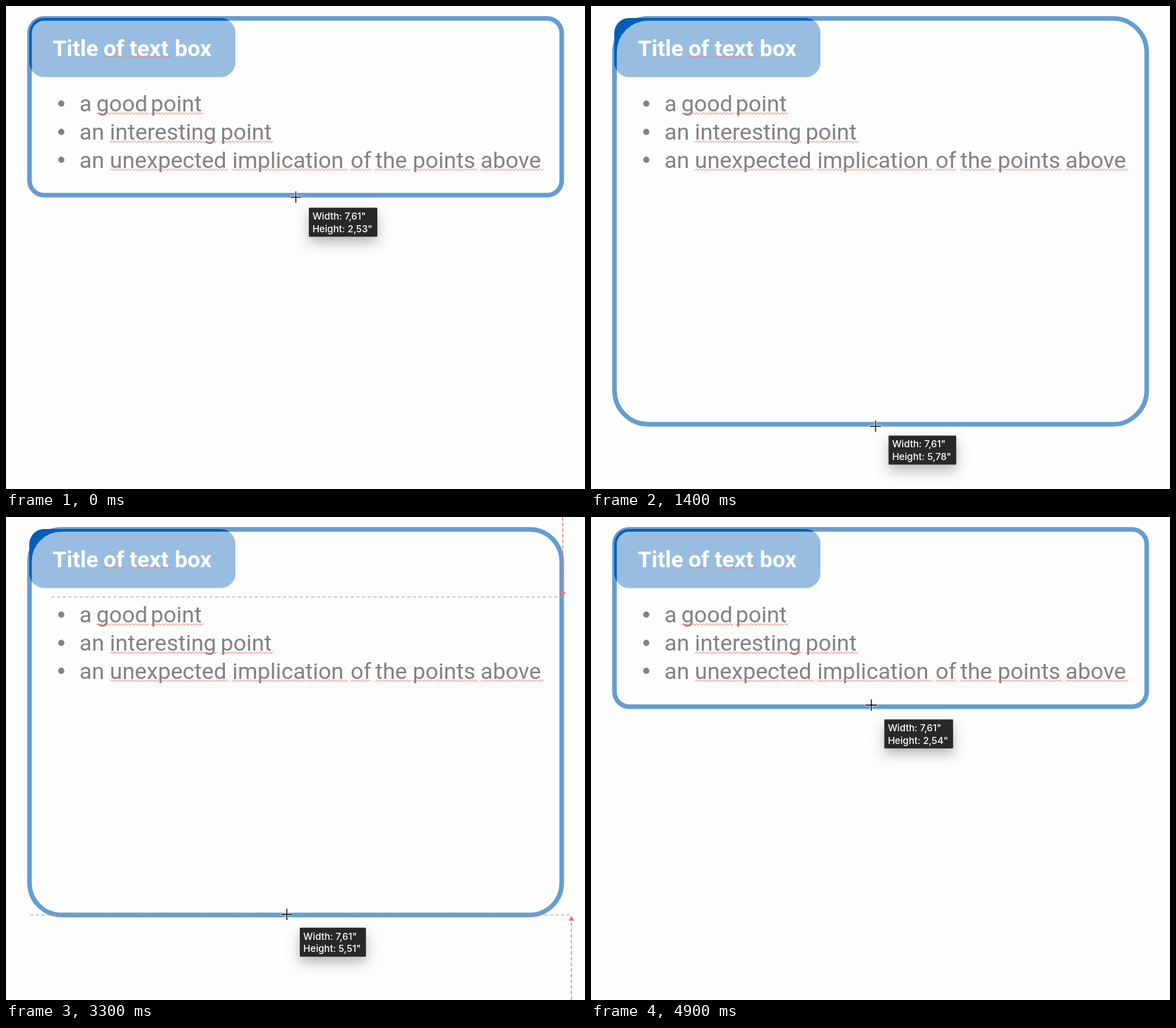
An HTML page for the animation above (5 s loop, 820 by 683 pixels).

```html
<!DOCTYPE html>
<html lang="en">
<head>
<meta charset="utf-8">
<title>Resizing a text box</title>
<style>
  html, body { margin: 0; width: 100%; height: 100%; overflow: hidden; background: #fdfdfc; }
  svg { display: block; width: 820px; height: 683px; }
  .title { font: 700 32px Roboto, Arial, sans-serif; fill: #fff; }
  .body { font: 400 32px Roboto, Arial, sans-serif; fill: #828282; }
  .squiggle { fill: none; stroke: #ee7b70; stroke-width: 1; }
  .guide { stroke: #a3a3a3; stroke-width: 1; stroke-dasharray: 5 3; }
  .arrow { stroke: #f0706a; stroke-width: 1.2; stroke-dasharray: 5 3; }
  .head { fill: #f0706a; }
  #tip rect { fill: #282828; filter: drop-shadow(0 8px 9px rgba(0, 0, 0, .28)); }
  #tip text { font: 500 13.4px Inter, Arial, sans-serif; fill: #fff; }
</style>
</head>
<body>
<svg viewBox="0 0 820 683">
  <rect width="820" height="683" fill="#fdfdfc"/>
  <rect x="33" y="17" width="292" height="83.5" rx="21" fill="#005eb6"/>
  <rect id="box" x="33.3" y="17.5" width="753.7" fill="#fdfdfc" stroke="#005eb6" stroke-width="6.5" opacity=".6"/>
  <g id="words"></g>
  <g id="guides"></g>
  <g id="tip">
    <rect height="41" rx="1"/>
    <text x="5" y="17">Width: 7,61"</text>
    <text id="size" x="5" y="34.5"></text>
  </g>
  <g id="cursor" fill="none">
    <path d="M-8.5 0H8.5M0 -8.5V8.5" stroke="#fff" stroke-width="3"/>
    <path d="M-8 0H8M0 -8V8" stroke="#000" stroke-width="1.3"/>
  </g>
</svg>
<script>
const $ = id => document.getElementById(id);
const LOOP = 5000, STEP = 100, TOP = 17.5, INCH = 99.1;

// Each line: class, baseline, then words as [x, text, underline end]
const lines = [
  ['title', 71, [[66, 'Title'], [138, 'of', 167], [175, 'text', 233], [239, 'box']]],
  ['body', 149, [[104, 'a'], [128, 'good', 201], [205, 'point', 279]]],
  ['body', 189, [[104, 'an'], [147, 'interesting', 298], [304, 'point', 378]]],
  ['body', 228.5, [[104, 'an'], [147, 'unexpected', 314], [320.5, 'implication', 483],
    [488, 'of', 516], [523, 'the', 571], [576, 'points', 665], [672, 'above', 760]]]
];

function squiggle(x, end, y) {
  let d = `M${x} ${y + 1.2}`;
  for (let up = true; x < end; up = !up) d += `L${x += 2.4} ${up ? y - 1.2 : y + 1.2}`;
  return `<path class="squiggle" d="${d}"/>`;
}

$('words').innerHTML = lines.map(([kind, y, words]) =>
  (kind === 'body' ? `<circle cx="78.3" cy="${y - 11}" r="4.4" fill="#828282"/>` : '') +
  `<text class="${kind}" y="${y}">` +
  words.map(([x, word]) => `<tspan x="${x}">${word}</tspan>`).join(' ') + '</text>' +
  words.filter(w => w[2]).map(([x, , end]) => squiggle(x, end, y + (kind === 'body' ? 3 : 0.5))).join('')
).join('');

// time, box bottom, pointer x, pointer y, shown height in inches
const keys = [
  [0, 267.6, 410.5, 270.3, 2.53],
  [700, 415.7, 406, 425.7, 3.96],
  [1400, 591.5, 403, 594.3, 5.78],
  [2100, 658.5, 398, 661, 6.5],
  [2300, 658.5, 397, 662.3, 6.51],
  [3300, 562.8, 397.7, 562, 5.51],
  [3800, 461.7, 397.7, 453.7, 4.53],
  [4900, 268.2, 397, 266, 2.54]
];

const secant = (i, c) => (keys[i + 1][c] - keys[i][c]) / (keys[i + 1][0] - keys[i][0]);

function slope(i, c) {
  if (i === 0 || i === keys.length - 1) return 0;
  const a = secant(i - 1, c), b = secant(i, c);
  return a * b <= 0 ? 0 : 2 * a * b / (a + b);
}

// Monotone cubic through the keys of one column
function track(t, c) {
  let i = 0;
  while (i < keys.length - 2 && t >= keys[i + 1][0]) i++;
  const [p, q] = [keys[i], keys[i + 1]];
  const span = q[0] - p[0], u = Math.min(1, (t - p[0]) / span), v = 1 - u;
  return p[c] * v * v * (1 + 2 * u) + q[c] * u * u * (3 - 2 * u) +
    span * (slope(i, c) * u * v * v - slope(i + 1, c) * u * u * v);
}

// Snap lines: bottom y, catch distance, matching line above (y, from, to)
const snaps = [
  { y: 338, reach: 8 },
  { y: 562.8, reach: 8, mate: [113, 64, 788.5] },
  { y: 658.5, reach: 1, mate: [17.5, 34, 339.5] }
];

const dash = (x1, x2, y) => `<line class="guide" x1="${x1}" x2="${x2}" y1="${y}" y2="${y}"/>`;

function arrow(x, from, tip) {
  const base = tip + 7 * Math.sign(from - tip);
  return `<line class="arrow" x1="${x}" x2="${x}" y1="${from}" y2="${base}"/>` +
    `<path class="head" d="M${x} ${tip}L${x - 3.8} ${base}H${x + 3.8}Z"/>`;
}

function guides(snap) {
  if (!snap) return '';
  if (!snap.mate) return dash(0, 820, snap.y);
  const [y, from, to] = snap.mate;
  return dash(34, 801, snap.y) + dash(from, to, y) +
    arrow(800.7, 683, snap.y + 1) + arrow(to, 0, y);
}

function draw(t) {
  let bottom = track(t, 1);
  const snap = snaps.find(s => Math.abs(s.y - bottom) < s.reach);
  if (snap) bottom = snap.y;
  const height = bottom - TOP;
  $('box').setAttribute('height', height);
  $('box').setAttribute('rx', height * 0.083);
  $('guides').innerHTML = guides(snap);

  const x = track(t, 2), inches = track(t, 4);
  $('cursor').setAttribute('transform', `translate(${x} ${track(t, 3)})`);
  $('size').textContent = `Height: ${inches.toFixed(2).replace('.', ',')}"`;
  $('tip').setAttribute('transform', `translate(${x + 18.4} ${inches * INCH + 34.6})`);
  $('tip').firstElementChild.setAttribute('width', $('size').getComputedTextLength() + 12);
}

const start = performance.now();
function tick() {
  const t = (performance.now() - start) % LOOP;
  draw(Math.floor(t / STEP) * STEP);
  requestAnimationFrame(tick);
}
tick();
</script>
</body>
</html>
```
